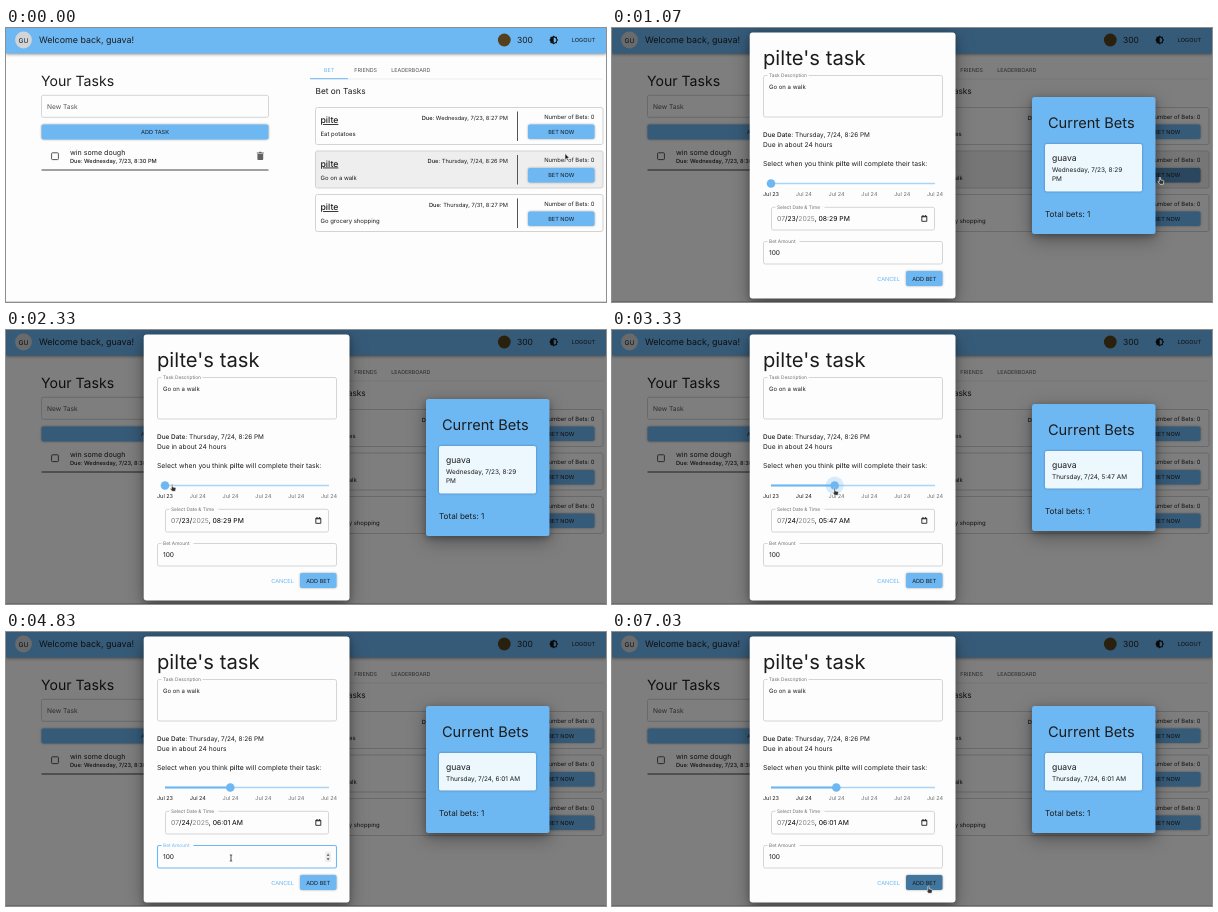
Animation of 600 by 274 pixels, one loop 7.07 s. Source, as an HTML page:

```html
<!DOCTYPE html>
<html lang="en">
<head>
<meta charset="utf-8">
<title>Task bets</title>
<style>
  html, body { margin: 0; width: 100%; height: 100%; overflow: hidden; background: #fdfdfd; }
  svg { display: block; width: 600px; height: 274px; }
  text { font-family: Inter, "Open Sans", sans-serif; text-rendering: geometricPrecision; white-space: pre; }
  .btn { filter: drop-shadow(0 .8px .8px #0005); }
  .paper { filter: drop-shadow(0 2px 3px #0004) drop-shadow(0 5px 9px #0005); }
</style>
</head>
<body>
<svg id="stage" viewBox="0 0 600 274" xmlns="http://www.w3.org/2000/svg"></svg>
<script>
const LOOP = 7070;
const BLUE = '#6db7f3', PRESSED = '#5590bf', DARK = '#41779f';
const INK = '#1c1c1c', GREY = '#707070', EDGE = '#cbcbcb', PAPER = '#fdfdfd';
const USER = 'guava', FRIEND = 'pilte';
const SLIDER = { x: 159, w: 164, minutes: 1437, start: 20 * 60 + 29 };
const OPEN = 790, DRAG = 2450, FOCUS = 4380, BLUR = 6780;

// Drawing helpers
const text = (x, y, size, str, attrs = '') =>
  `<text x="${x}" y="${y}" font-size="${size}" fill="${INK}" ${attrs}>${str}</text>`;
const mid = 'text-anchor="middle"', end = 'text-anchor="end"';
const rect = (x, y, w, h, fill, attrs = '') =>
  `<rect x="${x}" y="${y}" width="${w}" height="${h}" fill="${fill}" ${attrs}/>`;
const line = (x1, y1, x2, y2, color, w = 1) =>
  `<path d="M${x1} ${y1}L${x2} ${y2}" stroke="${color}" stroke-width="${w}"/>`;
const bold = s => `<tspan font-weight="500">${s}</tspan>`;
const button = (x, y, w, h, label, id = '') =>
  rect(x, y, w, h, BLUE, `rx="1.8" class="btn" id="${id}"`) +
  text(x + w / 2, y + h / 2 + 2, 5.6, label, mid);
const field = (x, y, w, h, label, labelW, id = '') =>
  rect(x, y, w, h, 'none', `rx="1.8" stroke="${EDGE}" stroke-width=".8" id="${id}"`) +
  (label ? rect(x + 4, y - 1, labelW + 3, 2, PAPER) +
    text(x + 5.5, y + 1.5, 4.8, label, `style="fill:${GREY}" id="${id}Label"`) : '');

function card(i, task, due) {
  const y = 79.5 + 43.5 * i;
  return rect(309.5, y, 287.5, 37, PAPER, `rx="2" stroke="#cfcfcf" stroke-width=".9" id="card${i}"`) +
    text(314.5, y + 15.5, 8.7, FRIEND, 'font-weight="500" text-decoration="underline"') +
    text(314.5, y + 28.5, 5.95, task) +
    text(502, y + 12, 5.7, bold('Due:') + ' ' + due, end) +
    line(511.5, y + 4, 511.5, y + 33.5, '#555') +
    text(588.5, y + 11, 5.85, 'Number of Bets: 0', end) +
    button(522, y + 17, 66.5, 14.5, 'BET NOW', 'bet' + i);
}

const page =
  rect(0, 0, 600, 274, PAPER) + rect(0, 273, 600, 1, '#d6d6d6') +
  rect(0, 0, 600, 25.5, BLUE, 'style="filter:drop-shadow(0 1px 1.5px #0006)"') +
  '<circle cx="17.5" cy="12" r="8.4" fill="#d2d5d8"/>' +
  text(17.5, 14.5, 6.6, USER.slice(0, 2).toUpperCase(), mid) +
  text(33, 15, 8.9, `Welcome back, ${USER}!`) +
  '<circle cx="498.3" cy="12" r="6.4" fill="#54401c"/>' +
  text(511, 15, 8.5, '300') +
  rect(544.5, 8.8, 6.4, 6.4, '#111') +
  rect(544.5, 8.8, 6.4, 6.4, '#111', 'transform="rotate(45 547.7 12)"') +
  `<path d="M547.7 9.4a2.6 2.6 0 0 1 0 5.2z" fill="${BLUE}"/>` +
  text(577.5, 14, 5.6, 'LOGOUT', mid) +
  text(35, 58, 14.1, 'Your Tasks') +
  field(35.5, 67.3, 227, 22) + text(41, 81, 6.6, 'New Task', 'style="fill:#555"') +
  button(35.5, 96.5, 227, 15, 'ADD TASK') +
  rect(45.6, 124.8, 6.8, 6.8, 'none', 'rx=".8" stroke="#555"') +
  text(64, 126.5, 7.1, 'win some dough') +
  text(64, 135, 5.65, 'Due: Wednesday, 7/23, 8:30 PM', 'font-weight="500"') +
  '<path d="M251.4 126h5.8v5.2q0 .8-.8.8h-4.2q-.8 0-.8-.8zM250.8 124.5h2l.7-.7h1.6l.7.7h2v1h-7z" fill="#626262"/>' +
  line(35.5, 142, 262.5, 142, '#444') +
  line(304, 51, 597, 51, '#e4e4e4', .7) + line(304, 50.7, 342, 50.7, BLUE) +
  text(323, 43.5, 5.4, 'BET', `${mid} style="fill:${BLUE}"`) +
  text(359.7, 43.5, 5.4, 'FRIENDS', mid + ' style="fill:#555"') +
  text(404.8, 43.5, 5.4, 'LEADERBOARD', mid + ' style="fill:#555"') +
  text(309.5, 66, 8.3, 'Bet on Tasks') +
  card(0, 'Eat potatoes', 'Wednesday, 7/23, 8:27 PM') +
  card(1, 'Go on a walk', 'Thursday, 7/24, 8:26 PM') +
  card(2, 'Go grocery shopping', 'Thursday, 7/31, 8:27 PM');

const marks = [0, 1, 2, 3, 4, 5].map(i =>
  text(SLIDER.x + SLIDER.w * i / 5, 168, 5.5, i ? 'Jul 24' : 'Jul 23', `${mid} id="mark${i}"`)).join('');

const dialog =
  rect(137.7, 4.6, 205.8, 266, PAPER, 'rx="3" class="paper"') +
  text(151, 36.5, 20.2, `${FRIEND}'s task`) +
  field(151.5, 47.5, 179, 41.5, 'Task Description', 38) + text(157, 61, 6, 'Go on a walk') +
  text(151, 109, 6.45, bold('Due Date:') + ' Thursday, 7/24, 8:26 PM') +
  text(151, 119, 6.65, 'Due in about 24 hours') +
  text(151, 138, 6.8, `Select when you think ${bold(FRIEND)} will complete their task:`) +
  line(159, 155.5, 323, 155.5, '#a9d4f8', 1.4) +
  `<path id="track" stroke="${BLUE}" stroke-width="2"/>` +
  `<circle id="halo" cy="155.5" r="9" fill="${BLUE}" opacity=".25"/>` +
  `<circle id="thumb" cy="155.5" r="4.3" fill="${BLUE}"/>` + marks +
  field(159.5, 179.3, 163, 22.7, 'Select Date &amp; Time', 46) +
  '<text id="when" x="165" y="193" font-size="6.8"></text>' +
  '<path d="M309.8 188.3h5v5h-5zM309.8 188.8h5M311 187v1.2M313.6 187v1.2" fill="none" stroke="#222" stroke-width=".9"/>' +
  field(151.5, 213.5, 179, 22.5, 'Bet Amount', 29, 'amount') + text(157, 227, 6.6, '100') +
  '<path id="caret" d="M168.6 221.3v7" stroke="#222" stroke-width=".6"/>' +
  '<g id="spin">' + rect(319.3, 219.8, 5.6, 10.2, '#ececec', 'rx=".8"') +
  '<path d="M320.6 223.8l1.5-2 1.5 2zM320.6 226.2l1.5 2 1.5-2z" fill="#555"/></g>' +
  text(276.5, 252.6, 5.6, 'CANCEL', `${mid} style="fill:${BLUE}"`) +
  button(294, 243, 36.5, 15, 'ADD BET', 'add');

const cursors = {
  arrow: 'M0 0v6.2l1.4-1.2 1 2.1 1.1-.5-1-2h1.9z',
  hand: 'M-.7 0q.7-.8 1.3 0v2.4l2.4.5q.8.2.8 1l-.5 2.9h-3.4l-2-2.7q.1-.9 1.4 0z',
  beam: 'M-1.2-3.2q1.2 0 1.2.7 0-.7 1.2-.7M0-2.5v5M-1.2 3.2q1.2 0 1.2-.7 0 .7 1.2.7'
};

const stage = document.getElementById('stage');
stage.innerHTML = page + '<g id="modal">' + rect(0, 0, 600, 274, '#000', 'opacity=".5"') +
  dialog + '<g id="bets"></g></g><path id="cursor" stroke-linejoin="round"/>';
const $ = id => document.getElementById(id);
const set = (id, attrs) => { for (const k in attrs) $(id).setAttribute(k, attrs[k]); };
const show = (id, on) => set(id, { visibility: on ? 'inherit' : 'hidden' });

// Pointer: time, x, y
const path = [
  [0, 559, 125.5], [120, 559, 125.5], [680, 548, 149.5], [1480, 548, 149.5], [2240, 167, 154.5],
  [2300, 167, 154.5], [DRAG, 159.2, 155], [3300, 222.68, 158.5], [3340, 222.68, 158.5],
  [3600, 224.28, 158], [3700, 224.28, 158], [4300, 225, 226], [5180, 225, 226],
  [5840, 425.5, 164.5], [5930, 425.5, 164.5], [6580, 316.5, 254.5], [LOOP, 316.5, 254.5]
];
function pointer(t) {
  const i = path.findIndex((p, n) => n && t <= p[0]);
  const [t0, x0, y0] = path[i - 1], [t1, x1, y1] = path[i];
  const u = (t - t0) / (t1 - t0), s = u * u * (3 - 2 * u);
  return [x0 + (x1 - x0) * s, y0 + (y1 - y0) * s];
}

const pad = n => String(n).padStart(2, '0');

// The panel is centred, so it shrinks from both ends when the date fits one line
function drawBets(day, clock) {
  const two = day === 23, d = two ? 0 : 5;
  const [time, half] = clock.split(' ');
  const date = two ? `Wednesday, 7/23, ${time}` : `Thursday, 7/24, ${clock}`;
  $('bets').innerHTML =
    rect(420, 69 + d, 123.5, 137 - 2 * d, BLUE, 'rx="2.5" class="paper"') +
    text(479.3, 99.5 + d, 14.6, 'Current Bets', mid) +
    rect(433, 116 + d, 97, 47.5 - 2 * d, '#edf7fe', 'rx="1.8" class="btn"') +
    text(440, 133 + d, 8.6, USER) + text(440, 143.8 + d, 6.45, date) +
    (two ? text(440, 152.8, 6.45, half) : '') +
    text(433, 189 - d, 8.1, 'Total bets: 1');
}

function draw(t) {
  const [x, y] = pointer(t);

  // Hover on the page, then the dialog fades in
  const rowHover = t < 1500, betHover = rowHover && y > 140;
  set('card1', { fill: rowHover ? '#eee' : PAPER });
  set('bet1', { fill: betHover ? PRESSED : BLUE });
  set('modal', { opacity: Math.min(1, Math.max(0, (t - OPEN) / 225)) });

  // Slider value drives the date field and the bets panel
  const knob = t < DRAG ? SLIDER.x : pointer(Math.min(t, 3600))[0];
  const minutes = Math.round((knob - SLIDER.x) / SLIDER.w * SLIDER.minutes);
  const total = SLIDER.start + minutes, day = 23 + Math.floor(total / 1440);
  const hour = Math.floor(total / 60) % 24, h12 = hour % 12 || 12;
  const rest = `:${pad(total % 60)} ${hour < 12 ? 'AM' : 'PM'}`;
  set('track', { d: `M159 155.5H${knob}` });
  set('thumb', { cx: knob });
  set('halo', { cx: knob });
  show('halo', t > DRAG - 60 && t < 3780);
  for (let i = 0; i < 6; i++)
    set('mark' + i, { fill: minutes >= SLIDER.minutes * i / 5 ? INK : GREY });
  $('when').innerHTML = `<tspan fill="#777">07</tspan>/${day}/<tspan fill="#888">2025</tspan>, ${pad(h12)}${rest}`;
  drawBets(day, h12 + rest);

  // Amount field focus
  const focus = t >= FOCUS && t < BLUR;
  set('amount', { stroke: focus ? BLUE : EDGE, 'stroke-width': focus ? 1.1 : .8 });
  $('amountLabel').style.fill = focus ? BLUE : GREY;
  show('spin', focus);
  show('caret', focus && (t - FOCUS) % 1000 < 400);

  const addHover = t > 6000 && x < 330.5 && y > 243;
  set('add', { fill: addHover ? DARK : BLUE });

  const beam = t > 3700 && t < 5700 && x < 330 && y > 213;
  const hand = betHover || addHover || (t > 2150 && t < 3780);
  set('cursor', {
    d: cursors[beam ? 'beam' : hand ? 'hand' : 'arrow'],
    transform: `translate(${x} ${y})`,
    fill: beam ? 'none' : hand ? '#333' : '#111',
    stroke: beam ? '#222' : '#fff',
    'stroke-width': beam ? .8 : .6
  });
}

const begin = performance.now();
function tick() {
  draw((performance.now() - begin) % LOOP);
  requestAnimationFrame(tick);
}
tick();
</script>
</body>
</html>
```
